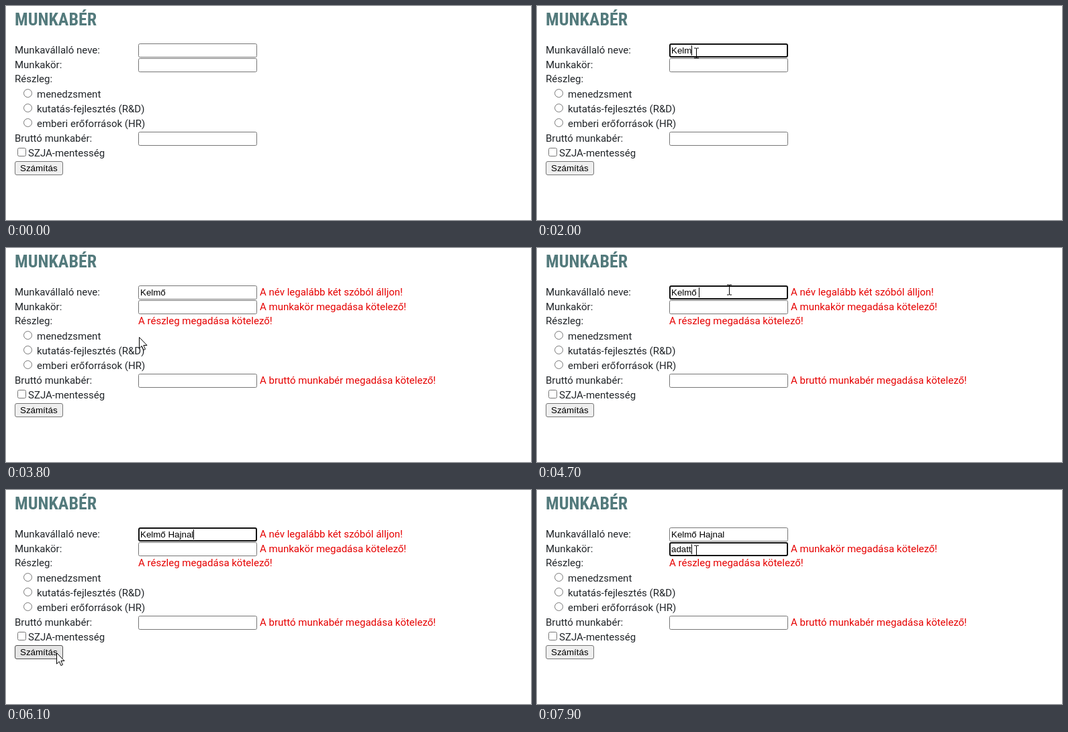
Recreate the animation shown at these times as an HTML page. Size 782 px wide and 320 px high, loop 8000 ms.

```html
<!DOCTYPE html>
<html lang="hu">
<head>
<meta charset="utf-8">
<title>Munkabér</title>
<style>
  html, body { margin: 0; width: 100%; height: 100%; overflow: hidden; background: #fff; }
  svg { display: block; width: 782px; height: 320px; }
  text { white-space: pre; fill: #212529; font: 15px Roboto, sans-serif; }
  .title { fill: #537a7c; font: 700 26px "Roboto Condensed", Roboto, sans-serif; font-stretch: 75%; }
  .control { fill: #000; font: 13.333px "Liberation Sans", Arial, sans-serif; }
  .error { fill: #e60000; }
  .box { fill: #fff; stroke: #767676; }
  .focused { stroke: #101010; stroke-width: 2; }
  .button { fill: #efefef; stroke: #767676; }
  .hover { fill: #e5e5e5; stroke: #4f4f4f; }
</style>
</head>
<body>
<svg id="stage" viewBox="0 0 782 320"></svg>
<script>
const LOOP = 8000, STEP = 100;
const stage = document.getElementById('stage');

function add(tag, attrs, content = '', parent = stage) {
  const el = document.createElementNS('http://www.w3.org/2000/svg', tag);
  for (const name in attrs) el.setAttribute(name, attrs[name]);
  el.textContent = content;
  return parent.appendChild(el);
}
const label = (x, y, content, cls = '') => add('text', { x, y, class: cls }, content);
const show = (el, on) => el.setAttribute('visibility', on ? 'visible' : 'hidden');

// Static form
label(13, 29, 'MUNKABÉR', 'title');
label(13, 71, 'Munkavállaló neve:');
label(13, 93, 'Munkakör:');
label(13, 114, 'Részleg:');
['menedzsment', 'kutatás-fejlesztés (R&D)', 'emberi erőforrások (HR)'].forEach((name, i) => {
  add('circle', { cx: 32.5, cy: 130.5 + 22 * i, r: 6, class: 'box' });
  label(46, 137 + 22 * i, name);
});
label(13, 203, 'Bruttó munkabér:');
add('rect', { x: 17.5, y: 212.5, width: 12, height: 12, rx: 2, class: 'box' });
label(33, 225, 'SZJA-mentesség');

const button = add('rect', { x: 13.5, y: 232.5, width: 71, height: 20, rx: 2.5 });
label(21, 247, 'Számítás', 'control');

function makeField(top) {
  const box = add('rect', { rx: 2 });
  const text = label(200, top + 15, '', 'control');
  const caret = add('rect', { y: top + 3, width: 1, height: 15 });
  return { top, box, text, caret };
}
const nameField = makeField(56), jobField = makeField(78), payField = makeField(188);

const errors = [
  { el: label(378, 71, 'A név legalább két szóból álljon!', 'error'), to: 6300 },
  { el: label(378, 93, 'A munkakör megadása kötelező!', 'error'), to: LOOP },
  { el: label(197, 114, 'A részleg megadása kötelező!', 'error'), to: LOOP },
  { el: label(378, 203, 'A bruttó munkabér megadása kötelező!', 'error'), to: LOOP }
];

// Pointers; both are drawn around their hot spot
const arrow = add('path', {
  d: 'M0 0V16.5L3.8 13L6.4 19L9 17.8L6.4 12H11.5Z',
  fill: '#fff', stroke: '#000', 'stroke-linejoin': 'round'
});
const beam = add('path', {
  d: 'M-3.5 -7.5H-1Q0 -7.5 0 -6.5Q0 -7.5 1 -7.5H3.5M0 -6.5V6.5M-3.5 7.5H-1Q0 7.5 0 6.5Q0 7.5 1 7.5H3.5',
  fill: 'none', stroke: '#000'
});

// Time, x, y
const path = [
  [100, 524, 268], [800, 237, 70], [2200, 237, 70], [2700, 63, 243],
  [3400, 63, 243], [4100, 286, 62], [5600, 286, 62], [6000, 75, 243],
  [6400, 75, 243], [6700, 235, 94], [6900, 237, 90], [LOOP, 237, 90]
];

const FULL_NAME = 'Kelmő Hajnal', JOB = 'adatt';
const nameKeys = [1200, 1500, 1700, 1900, 2100, 4500, 4900, 5000, 5200, 5300, 5500, 5700];
const jobKeys = [7300, 7400, 7600, 7700, 7900];
const nameFocus = [[900, 2700], [4200, 6200]], jobFocus = [[6900, LOOP]];

function pointerAt(t) {
  const i = path.findIndex(p => p[0] > t);
  if (i < 1) return null;
  const [t0, x0, y0] = path[i - 1], [t1, x1, y1] = path[i];
  const u = (t - t0) / (t1 - t0), e = u * u * (3 - 2 * u);
  return { x: x0 + (x1 - x0) * e, y: y0 + (y1 - y0) * e };
}

function drawField(field, t, value = '', keys = [], spans = []) {
  const span = spans.find(([from, to]) => t >= from && t < to);
  const inset = span ? 1 : 0.5;
  const attrs = {
    x: 197 + inset, y: field.top + inset,
    width: 177 - 2 * inset, height: 21 - 2 * inset,
    class: span ? 'box focused' : 'box'
  };
  for (const name in attrs) field.box.setAttribute(name, attrs[name]);

  const typed = keys.filter(k => k <= t);
  field.text.textContent = value.slice(0, typed.length);
  // The caret blinks from the last key or click
  const since = span ? t - Math.max(span[0], ...typed) : 0;
  show(field.caret, span && since % 1000 < 500);
  field.caret.setAttribute('x', Math.round(200 + field.text.getComputedTextLength()));
}

function draw(t) {
  drawField(nameField, t, FULL_NAME, nameKeys, nameFocus);
  drawField(jobField, t, JOB, jobKeys, jobFocus);
  drawField(payField, t);
  errors.forEach(({ el, to }) => show(el, t >= 3200 && t < to));

  const p = pointerAt(t);
  const within = (x, y, w, h) => !!p && p.x >= x && p.x < x + w && p.y >= y && p.y < y + h;
  const overField = [56, 78, 188].some(top => within(197, top, 177, top === 78 ? 21 : 21));
  button.setAttribute('class', within(13, 232, 72, 21) ? 'button hover' : 'button');
  show(arrow, p && !overField);
  show(beam, overField);
  if (p) {
    const at = `translate(${Math.round(p.x) + 0.5} ${Math.round(p.y) + 0.5})`;
    arrow.setAttribute('transform', at);
    beam.setAttribute('transform', at);
  }
}

const start = performance.now();
function tick() {
  const t = (performance.now() - start) % LOOP;
  draw(Math.floor(t / STEP) * STEP);
  requestAnimationFrame(tick);
}
tick();
</script>
</body>
</html>
```
